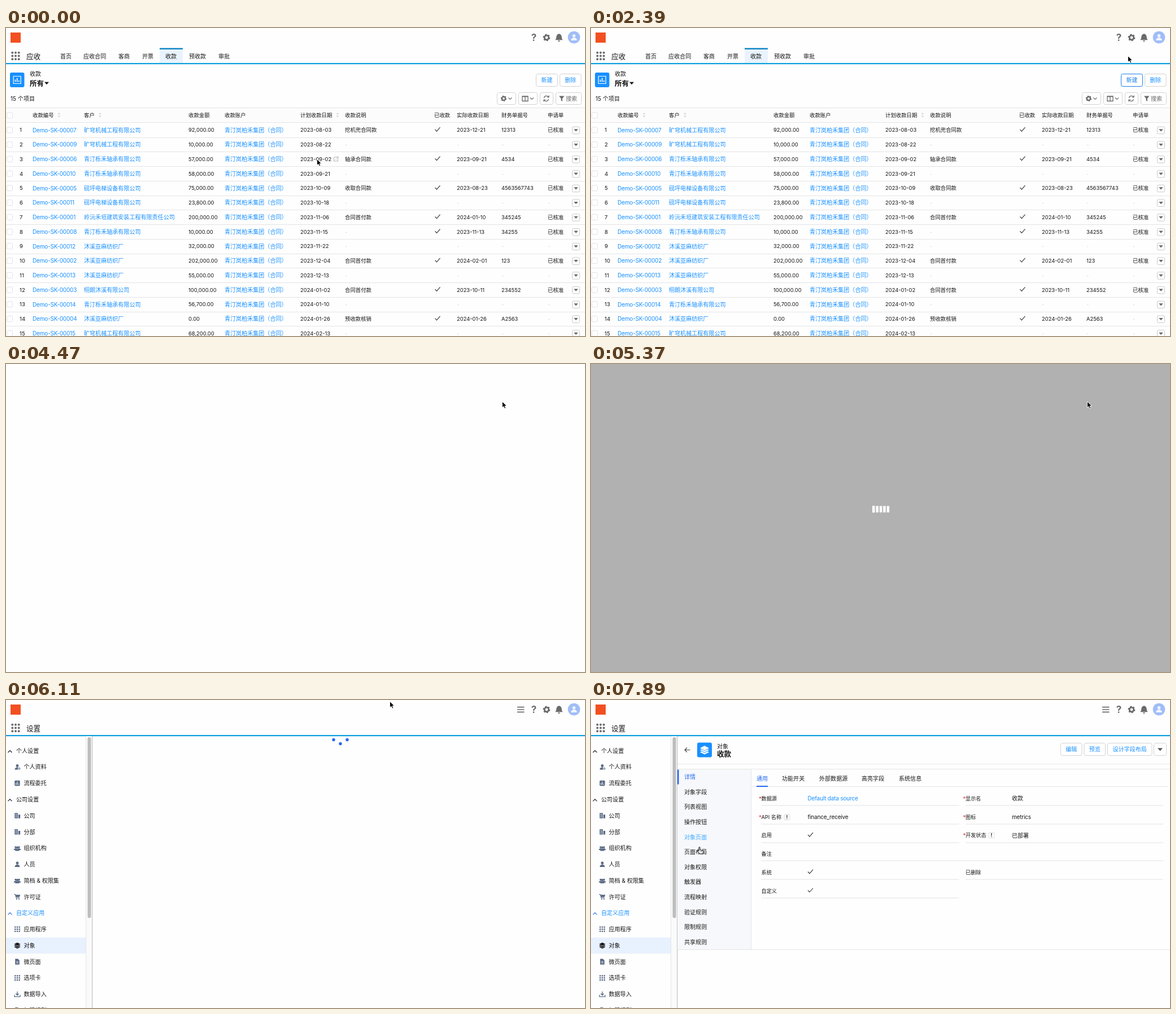
Animation, 1025 px wide and 546 px high, one loop 8 s. Source, as an HTML page:

```html
<!DOCTYPE html>
<html lang="zh-CN">
<head>
<meta charset="utf-8">
<title>应收</title>
<style>
html, body { margin: 0; width: 100%; height: 100%; overflow: hidden; background: #fefefe; }
svg { display: block; width: 100%; height: 100%; }
text { font-family: Inter, "Noto Sans CJK SC", "Noto Sans CJK", sans-serif; white-space: pre; }
.tight { letter-spacing: -.2px; }
.bar { transform-box: fill-box; transform-origin: center; }
</style>
</head>
<body>
<svg id="stage" viewBox="0 0 1025 546" xmlns="http://www.w3.org/2000/svg"></svg>
<script>
const INK = '#161616', BLUE = '#1890ff', ROYAL = '#2468f2', CYAN = '#0c9fdc', GRAY = '#6b6b6b', SLATE = '#5a6a84', RULE = '#e4e4e4';

// Drawing helpers; text is centred on y
const text = (x, y, s, fill = INK, size = 10.05, more = '') =>
  `<text x="${x}" y="${(y + size * .37).toFixed(2)}" font-size="${size}" fill="${fill}" ${more}>${s}</text>`;
const rect = (x, y, w, h, fill, more = '') =>
  `<rect x="${x}" y="${y}" width="${w}" height="${h}" fill="${fill}" ${more}/>`;
const box = (x, y, w, h, stroke = '#d2d2d2', r = 3, more = '') =>
  rect(x + .5, y + .5, w - 1, h - 1, '#fff', `rx="${r}" stroke="${stroke}" ${more}`);
const path = (d, fill, more = '') => `<path d="${d}" fill="${fill}" ${more}/>`;
const stroke = (d, color, w = 1.2, more = '') => path(d, 'none', `stroke="${color}" stroke-width="${w}" ${more}`);
const dot = (x, y, r, fill) => `<circle cx="${x}" cy="${y}" r="${r}" fill="${fill}"/>`;
const at = (x, y, s, k = 1) => `<g transform="translate(${x} ${y}) scale(${k})">${s}</g>`;
const group = (id, s) => `<g id="${id}">${s}</g>`;
const hline = (x1, x2, y, color = RULE) => rect(x1, y, x2 - x1, 1, color);
const caret = (x, y, w, color) => path(`M${x - w / 2} ${y - w / 4}h${w}l${-w / 2} ${w * .56}z`, color);
const check = (x, y) => stroke(`M${x - 4.5} ${y}l3 3.2 6-7`, '#333', 1.1);
const range = n => [...Array(n).keys()];

// Icons around 0,0
const PERSON = 'M0-5a2.6 2.6 0 1 1-.01 0zM-4.8 5c0-6 9.6-6 9.6 0z';
const person = c => path(PERSON, c);
const grid = (c, gap, r) => range(9).map(i => dot((i % 3 - 1) * gap, ((i / 3 | 0) - 1) * gap, r, c)).join('');
const gear = c => `<g fill="none" stroke="${c}"><circle r="3.8" stroke-width="2.8"/>
  <circle r="5.4" stroke-width="2" pathLength="12" stroke-dasharray="1 1"/></g>`;
const layers = c => path('M0-5.5 6-2.5 0 .5-6-2.5z', c) +
  path('M-6 .2-4-.8 0 1.2 4-.8 6 .2 0 3.2zM-6 2.9-4 1.9 0 3.9 4 1.9 6 2.9 0 5.9z', c);
const bell = c => path('M-6.2 4.2c2-2 1.6-4 2-6C-3.8-4.200-2-5.300-.8-5.500a.8.8 0 0 1 1.600 0C2-5.300 3.800-4.200 4.200-1.800c.4 2 0 4 2 6zM-1.800 5.200h3.600a1.800 1.800 0 0 1-3.600 0z', c);
const people = c => at(-3.2, 0, person(c), .72) + at(3.2, 0, person(c), .72) + at(0, 1, person(c), .85);
const building = c => path('M-5-5h6v10h-6z', c) + rect(2, -2, 3.5, 7, c) +
  stroke('M-3.500-2.500h3M-3.500 0h3M-3.500 2.500h3', '#fff', .9);
const chartBox = c => rect(-5, -5, 10, 10, c, 'rx="1.500"') + stroke('M-2.500 3v-3M0 3v-6M2.500 3v-2', '#fff', 1.2);
const userGear = c => person(c) + dot(3.600, 3, 2.700, '#fefefe') + at(3.600, 3, gear(c), .36);
const cart = c => stroke('M-6-4.500h2l2 6.500h6', c, 1.2) + path('M-3.600-3.700h9.300l-1.500 4.500h-6.500z', c) +
  dot(-1, 4.300, 1.100, c) + dot(3.200, 4.300, 1.100, c);
const doc = c => path('M-4-5.500h5l3 3v8h-8z', c) + stroke('M-2 0h4M-2 2.500h4', '#fff', 1);
const load = c => stroke('M0-5v6.500M-2.800-1 0 2 2.800-1M-5.300 1.500v3.300h10.600v-3.300', c, 1.4);
const cells = c => grid(c, 4, 1.4);

function topBar(app, menu) {
  return rect(0, 0, 1025, 62, '#fefefe') + rect(8, 8, 18, 18, '#f25022') +
    at(17, 49.5, grid(GRAY, 5.7, 2)) + text(36, 50, app, INK, 12.6) +
    (menu ? stroke('M905 12.700h12.500M905 17h12.500M905 21.300h12.500', GRAY, 1.7) : '') +
    text(934.5, 17, '?', GRAY, 17, 'font-weight="700" text-anchor="middle"') +
    at(957, 17, gear(GRAY)) + at(979, 16.7, bell(GRAY), 1.08) +
    dot(1005.500, 16.500, 10.800, '#a0bdf9') + at(1005.500, 16.500, person('#f1f5fe'), 1.1) +
    rect(0, 62, 1025, 2.2, CYAN);
}

const button = (x, y, w, label) => box(x, y, w, 23) +
  text(x + w / 2, y + 11.4, label, BLUE, 10.05, 'text-anchor="middle"');

// Receipts list
const CLIENTS = {
  a: '旷穹机械工程有限公司', b: '青汀栎禾轴承有限公司', c: '砚坪电梯设备有限公司',
  d: '岭沅禾垣建筑安装工程有限责任公司', e: '沐溪亚麻纺织厂', f: '栩朗沐溪有限公司'
};
const ACCOUNT = '青汀岚柏禾集团（合同）', OK = '已核准';
// id client amount due note paid voucher approval
const ROWS = `07 a 92,000.00 2023-08-03 挖机兜合同款 2023-12-21 12313 ${OK}
09 a 10,000.00 2023-08-22
06 b 57,000.00 2023-09-02 轴承合同款 2023-09-21 4534 ${OK}
10 b 58,000.00 2023-09-21
05 c 75,000.00 2023-10-09 收取合同款 2023-08-23 4563567743 ${OK}
11 c 23,800.00 2023-10-18
01 d 200,000.00 2023-11-06 合同首付款 2024-01-10 345245 ${OK}
08 b 10,000.00 2023-11-15 - 2023-11-13 34255 ${OK}
12 e 32,000.00 2023-11-22
02 e 202,000.00 2023-12-04 合同首付款 2024-02-01 123 ${OK}
13 e 55,000.00 2023-12-13
03 f 100,000.00 2024-01-02 合同首付款 2023-10-11 234552 ${OK}
14 b 56,700.00 2024-01-10
04 e 0.00 2024-01-26 预收款核销 2024-01-26 A2563
15 a 68,200.00 2024-02-13`.split('\n').map(r => r.split(' '));

const HEADS = [['收款编号', 47], ['客户', 138], ['收款金额', 323], ['收款账户', 387], ['计划收款日期', 521],
  ['收款说明', 600], ['已收款', 758], ['实际收款日期', 798], ['财务单据号', 877], ['申请单', 959]];

const tickBox = y => box(1, y - 5.5, 11, 11, '#e2e2e2', 2);
const sorter = x => path(`M${x - 2.500} 153l2.500-3 2.500 3zM${x - 2.500} 155.500l2.500 3 2.500-3z`, '#d6d6d6');

function row([id, client, sum, due, ...rest], i) {
  const y = 180.9 + 25.75 * i;
  const small = (x, s) => s && s !== '-' ? text(x, y, s, INK, 9.4) : text(x, y, '-', '#d4d4d4', 9.4);
  return tickBox(y) + text(24, y, i + 1, INK, 9.6) +
    text(47, y, 'Demo-SK-000' + id, BLUE, 10.05, 'class="tight"') +
    text(138, y, CLIENTS[client], BLUE) + small(323, sum) + text(387, y, ACCOUNT, BLUE) + small(521, due) +
    [600, 798, 877, 959].map((x, k) => small(x, rest[k])).join('') +
    (rest[1] ? check(764, y - 1) : '') +
    box(1002, y - 6.2, 14, 13.5, '#c9c9c9', 2) + caret(1009, y + .3, 7.5, '#666') +
    hline(0, 1025, Math.round(y + 12.6));
}

function listPage() {
  const tabs = [['首页', 96], ['应收合同', 137], ['客商', 199], ['开票', 241], ['收款', 282], ['预收款', 324], ['审批', 376]];
  const bars = 'M-3.200 3.500v-4M0 3.500v-7M3.200 3.500v-2.500';
  const chevron = x => stroke(`M${x - 3} 123.500l3 3 3-3`, GRAY, 1.1);
  return topBar('应收') + rect(272, 36, 41, 26, '#e9f3fe') + rect(272, 35.500, 41, 2.500, '#1287c6') +
    tabs.map(([s, x]) => text(x, 50, s)).join('') +
    rect(7, 79, 25.500, 26, BLUE, 'rx="3"') +
    at(19.700, 92, stroke('M-6.500-6.500h13v13h-13z', '#fff', 1.2, 'stroke-linejoin="round"') + stroke(bars, '#fff', 1.6)) +
    text(42, 81, '收款') + text(42, 98, '所有', INK, 12.5, 'font-weight="700"') + caret(72, 97.700, 8, INK) +
    button(938, 81, 39, '新建') + button(980, 81, 38.500, '删除') +
    group('focus', box(938, 81, 39, 23, '#1a7fe8') + text(957.5, 92.4, '新建', '#1a7fe8', 10.05, 'text-anchor="middle"')) +
    text(8, 125.2, '15 个项目') +
    box(869, 114, 34, 22) + at(881, 125, gear(GRAY), .82) + chevron(892.500) +
    box(907, 114, 34, 22) + stroke('M914 121h10v8.500h-10zM919 121v8.500M914 121.500h10', GRAY, 1.3) + chevron(931) +
    box(945, 114, 24, 22) +
    stroke('M952.500 124a4.300 4.300 0 0 1 8-1.500M960.500 126a4.300 4.300 0 0 1-8 1.500M961 119.500v3.200h-3.200M952 130.500v-3.200h3.200', GRAY, 1.3) +
    box(973, 114, 46, 22) + path('M979 120.500h9.500l-3.600 4.500v5l-2.300-1.500v-3.500z', GRAY) + text(991, 125, '搜索', '#666') +
    rect(0, 142, 1025, 26, '#fcfcfc') + hline(0, 1025, 141) + hline(0, 1025, 167) + tickBox(155) +
    HEADS.map(([s, x]) => text(x, 155, s, INK, 9.4, 'font-weight="500"')).join('') +
    [94, 166.500, 587].map(sorter).join('') + ROWS.map(row).join('') +
    group('edit', stroke('M584.500 229h-4v7h7v-4M583 233.500l5-5M585 228.500h3v3', '#aaa', .9)) +
    group('menu', rect(848.500, 28.500, 115, 57, '#fff', 'rx="3" stroke="#d8d8d8"') + text(857, 46, '设置', INK, 9.7) +
      text(857, 69.700, '编辑对象', INK, 9.7, 'id="pick"'));
}

// Settings
const SIDE = [['个人设置'], ['个人资料', userGear], ['流程委托', chartBox], ['公司设置'], ['公司', building], ['分部', building],
  ['组织机构', people], ['人员', person], ['简档 &amp; 权限集', people], ['许可证', cart], ['自定义应用'], ['应用程序', cells],
  ['对象', layers], ['微页面', doc], ['选项卡', cells], ['数据导入', load], ['权限规则', doc]];
const sideY = i => 90 + 28.76 * i;

function settingsPage() {
  const items = SIDE.map(([s, icon], i) => {
    const y = sideY(i), c = i === 10 ? ROYAL : INK;
    return icon ? text(31.500, y, s) :
      text(18, y, s, i === 10 ? BLUE : INK) + stroke(`M3.500 ${y + 3}l3.500-3.500 3.500 3.500`, c, 1.1);
  }).join('');
  const icons = SIDE.map(([s, icon], i) => icon ? at(20, sideY(i), icon(s === '对象' ? INK : SLATE), .94) : '').join('');
  return topBar('设置', true) + rect(0, 421, 141, 28.500, '#e8f1fe') + items + group('icons', icons) +
    rect(141, 64, 12, 482, '#fafafa') + rect(141, 64, 1, 482, '#e6e6e6') +
    rect(144.500, 66, 6, 320.500, '#bdbdbd', 'rx="3"') + rect(152, 64, 1.3, 482, '#c6c6c6');
}

function field(x, y, name, value, must) {
  return text(x, y, name, INK, 9.2) + (must ? text(x - 4.500, y + .8, '*', '#e8313a', 10) : '') +
    (value === '✓' ? check(x + 87, y - 1) :
      text(x + 82, y, value, value[0] === 'D' ? BLUE : INK, 10.05, /\w/.test(value) ? 'class="tight"' : ''));
}
const hint = (x, y) => box(x - 5.500, y - 5.500, 11, 11, '#dcdcdc', 2) + text(x, y, '!', INK, 9, 'text-anchor="middle" font-weight="600"');

function detailPage() {
  const nav = '详情 对象字段 列表视图 操作按钮 对象页面 页面布局 对象权限 触发器 流程映射 验证规则 限制规则 共享规则'.split(' ');
  const tabs = [['通用', 293], ['功能开关', 338], ['外部数据源', 404], ['高亮字段', 479], ['系统信息', 545]];
  const L = 301.500, R = 663, Y = i => 174.300 + 32.8 * i, lineY = i => Math.round(187 + 32.8 * i) - .5;
  return stroke('M175.500 88.500h-9.500M170 84.500l-4 4 4 4', '#444', 1.2) +
    rect(188, 75.500, 26, 26, BLUE, 'rx="3"') + at(201, 88.500, layers('#fff'), 1.35) +
    text(223, 82, '对象') + text(223, 95, '收款', INK, 12.600, 'font-weight="700"') +
    button(831, 76, 38.500, '编辑') + button(872.500, 76, 38.500, '预览') + button(914, 76, 79.500, '设计字段布局') +
    box(996, 76, 23, 23) + caret(1007.500, 87.500, 9, '#555') +
    hline(153, 1025, 113) + hline(153, 1025, 122) + rect(153, 123, 130.500, 319, '#f6f8fb') +
    rect(283, 123, 1, 319, RULE) + hline(153, 1025, 442) + rect(153, 123.500, 2.500, 26, ROYAL) +
    nav.map((s, i) => text(165, 136.300 + 26.62 * i, s, i ? INK : ROYAL, 10.05, `id="nav${i}"`)).join('') +
    tabs.map(([s, x], i) => text(x, 139.300, s, i ? INK : ROYAL)).join('') +
    hline(284, 1021, 153) + rect(293, 152, 20, 2, ROYAL) +
    field(L, Y(0), '数据源', 'Default data source', 1) + field(R, Y(0), '显示名', '收款', 1) +
    field(L, Y(1), 'API 名称', 'finance_receive', 1) + hint(347, Y(1) + .7) + field(R, Y(1), '图标', 'metrics', 1) +
    field(L, Y(2), '启用', '✓') + field(R, Y(2), '开发状态', '已部署', 1) + hint(709, Y(2)) +
    field(L, Y(3), '备注', '') + field(L, Y(4), '系统', '✓') + field(R, Y(4), '已删除', '') + field(L, Y(5), '自定义', '✓') +
    range(6).map(i => hline(L, i === 3 ? 1013 : 651.500, lineY(i)) +
      (i === 3 || i === 5 ? '' : hline(R, 1013, lineY(i)))).join('');
}

const ARROW = path('M0 0v11l2.600-2.300 1.700 3.900 2-.9-1.700-3.700h3.400z', '#000', 'stroke="#fff" stroke-width=".9"');
const HAND = path('M-.5 1.200c0-1.500 2-1.500 2 0v4l4.500 1c1.200.3 1.500 1 1.300 2.300l-.8 3.800h-5.500c-1-2-2.500-3-3.800-4.800-.5-1 .8-1.800 1.600-1l.7.8z',
  '#fff', 'stroke="#000" stroke-width="1"') + stroke('M2.900 7v2M4.800 7.300v1.800', '#000', .7);

const stage = document.getElementById('stage');
stage.innerHTML = rect(0, 0, 1025, 546, '#fefefe') + group('list', listPage()) + group('settings', settingsPage()) +
  group('detail', detailPage()) +
  group('veil', rect(0, 0, 1025, 546, 'rgba(0,0,0,.302)') +
    range(5).map(i => rect(498 + 6.4 * i, 243, 4.5, 29, '#fff', 'class="bar"')).join('')) +
  group('dots', range(3).map(() => dot(0, 0, 2.700, ROYAL)).join('')) +
  group('arrow', ARROW) + group('hand', HAND);

const $ = id => document.getElementById(id);
const show = (id, on) => { $(id).style.display = on ? '' : 'none'; };
const bars = [...document.querySelectorAll('.bar')].map((el, i) => {
  const low = 'scaleY(.4)';
  const a = el.animate([
    { transform: low, offset: 0, easing: 'ease' }, { transform: 'scaleY(1)', offset: .2, easing: 'ease' },
    { transform: low, offset: .4 }, { transform: low, offset: 1 }
  ], { duration: 1200, delay: 100 * i - 1200, iterations: Infinity });
  a.pause();
  return a;
});

// Time and pointer position of each step
const STEPS = [
  [0, 550, 232], [150, 606, 195], [300, 671, 152], [450, 715, 124], [600, 739, 108],
  [1040, 765, 98], [1190, 815, 84], [1340, 870, 74], [1490, 915, 71], [1640, 945, 78], [1790, 956, 88],
  [2390, 950, 49], [2540, 951, 30], [2690, 950, 22], [3140, 950, 22], [3430, 925, 42], [3580, 888, 75],
  [3720, 878, 66], [4020, 878, 66], [4170, 878, 66], [4470, 878, 66], [5370, 878, 66],
  [5520, 858, 48], [5670, 800, 20], [5820, 740, -30], [5970, 700, -30], [6110, 679, 2], [6260, 790, 30],
  [6410, 864, 61], [6560, 760, 85], [6710, 560, 130], [6850, 380, 180], [7000, 250, 218], [7150, 190, 239],
  [7740, 190, 248], [7890, 191, 260]
];

function draw([t, x, y]) {
  const within = (a, b) => t >= a && t < b;
  show('list', t < 4470);
  show('edit', t < 150);
  show('focus', within(1790, 2540));
  show('menu', within(3140, 4470));
  $('pick').setAttribute('fill', t >= 4170 ? '#0b6fd0' : t >= 3580 ? BLUE : INK);
  show('settings', t >= 5820);
  show('icons', t >= 6110);
  show('detail', t >= 6410);
  show('veil', within(5370, 6110));
  bars.forEach(a => { a.currentTime = Math.max(0, t - 5355); });

  show('dots', within(5970, 6410));
  const k = t === 6110 ? 1 : t === 6260 ? .5 : 0;
  [...$('dots').children].forEach((d, i) => {
    d.setAttribute('cx', 592 + (i - 1) * (6.5 + 5.5 * k));
    d.setAttribute('cy', i === 1 ? 71.5 + 6 * k : 67.5 + 3 * k);
  });

  $('nav4').setAttribute('fill', t >= 7150 ? '#40a9ff' : INK);
  const onLink = t === 1790 || t >= 7000;
  show('arrow', !onLink);
  show('hand', onLink);
  $(onLink ? 'hand' : 'arrow').setAttribute('transform', `translate(${x + .5} ${y + .5})`);
}

const start = performance.now();
let last = null;
function tick() {
  const t = (performance.now() - start) % 8000;
  const step = STEPS.findLast(s => s[0] <= t);
  if (step !== last) draw(last = step);
  requestAnimationFrame(tick);
}
tick();
</script>
</body>
</html>
```
